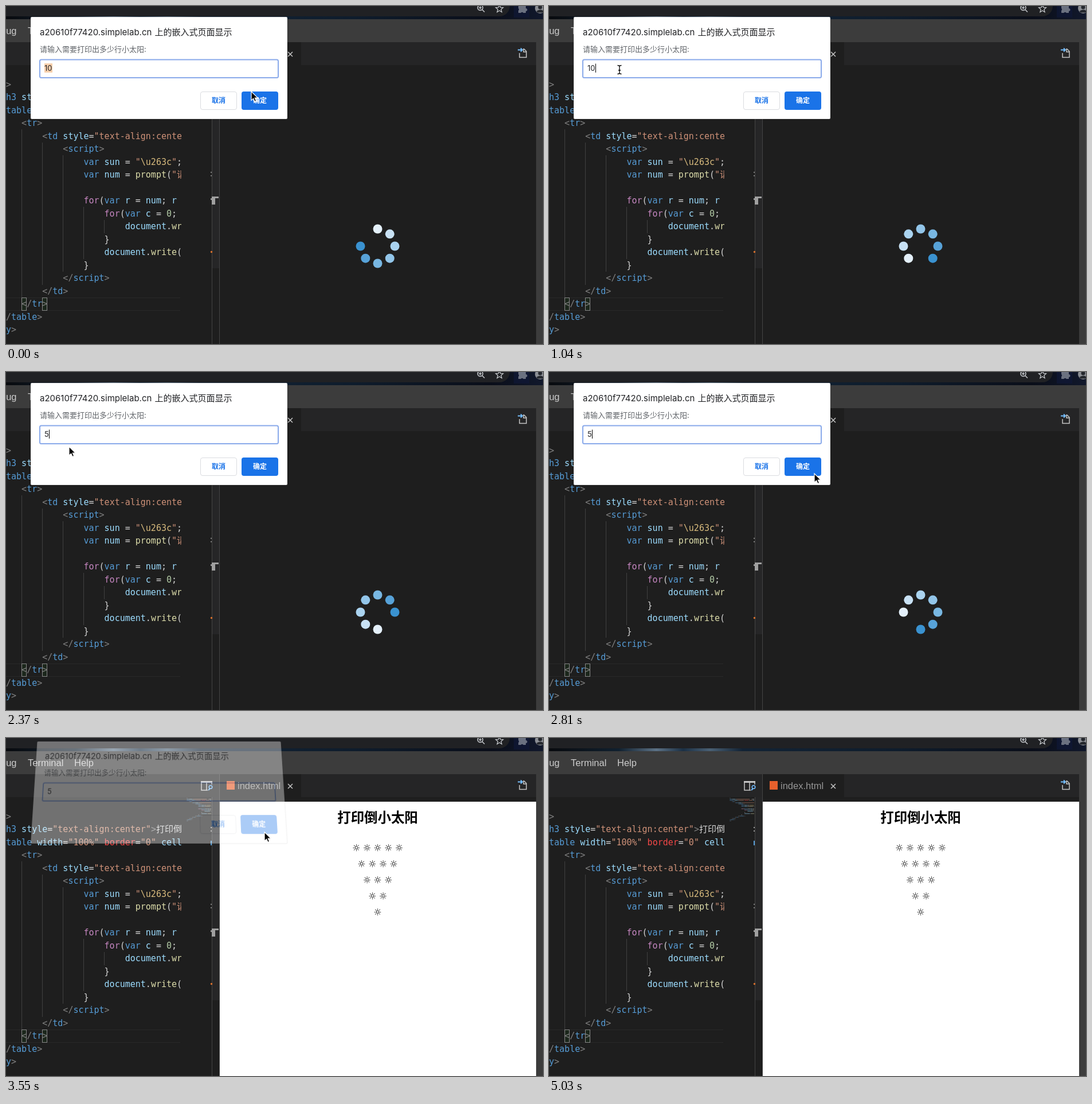
Animation, 937 px wide and 589 px high, one loop 5.33 s. Source, as an HTML page:

```html
<!DOCTYPE html>
<html lang="zh-CN">
<head>
<meta charset="utf-8">
<title>Prompt demo</title>
<style>
html, body { margin: 0; width: 937px; height: 589px; overflow: hidden; background: #1e1e1e; }
svg { position: absolute; left: 0; top: 0; overflow: hidden; }
text { white-space: pre; }
.ui { font: 16.5px "Liberation Sans", Arial, sans-serif; }
.code { font: 15px "DejaVu Sans Mono", "Noto Sans CJK SC", monospace; }
.cjk { font-family: "Noto Sans CJK SC", "Noto Sans CJK", sans-serif; }
.latin { font-family: Inter, sans-serif; }
.button { font: bold 12px "Noto Sans CJK SC", "Noto Sans CJK", sans-serif; text-anchor: middle; }
#dialog { transform-origin: 267px 197px; }
</style>
</head>
<body>
<svg width="937" height="589" viewBox="0 0 937 589">
  <defs>
    <clipPath id="codeClip"><rect y="103" width="306" height="486"/></clipPath>
    <clipPath id="mapClip"><rect x="314" y="103" width="44" height="60"/></clipPath>
    <linearGradient id="sky">
      <stop offset="0" stop-color="#080a0e"/>
      <stop offset=".13" stop-color="#10202f"/>
      <stop offset=".2" stop-color="#5c7185"/>
      <stop offset=".25" stop-color="#1b3045"/>
      <stop offset=".3" stop-color="#4a6074"/>
      <stop offset=".36" stop-color="#122335"/>
      <stop offset=".65" stop-color="#0e1c2c"/>
      <stop offset=".9" stop-color="#0a0e19"/>
      <stop offset="1" stop-color="#11182c"/>
    </linearGradient>
  </defs>

  <!-- browser bar -->
  <rect width="937" height="23" fill="url(#sky)"/>
  <rect x="-30" y="-20" width="909" height="38" rx="18" fill="#202124"/>
  <g fill="none" stroke="#c4c7cb" stroke-width="1.6">
    <circle cx="827.5" cy="3" r="4.5"/>
    <path d="M831 6.5l4 4M825 3h5M827.5 .5v5"/>
    <path d="M861 -2l1.8 4.3 4.700.4-3.600 3.100 1.100 4.700-4-2.500-4 2.500 1.100-4.700-3.600-3.100 4.700-.4z" stroke-width="1.3"/>
  </g>
  <rect x="886" width="27" height="20" fill="#10183a" opacity=".6"/>
  <path d="M894 0h4a2.500 2.500 0 0 1 5 0h4v4a2.500 2.500 0 0 1 0 5v3h-4.500a2.200 2.200 0 0 0-4 0h-4.500v-4a2.500 2.500 0 0 0 0-4z" fill="#6b7180"/>
  <circle cx="932" cy="4" r="9" fill="#8b8e94"/>
  <circle cx="932" cy="2" r="3.500" fill="#24272d"/>
  <path d="M925.500 9q6.500-5 13 0l-2 2.500h-9z" fill="#24272d"/>

  <!-- menu and tabs -->
  <rect y="23" width="937" height="566" fill="#3c3c3c"/>
  <g class="ui" fill="#ccc">
    <text x="18.500" y="49" text-anchor="end">Debug</text>
    <text x="38" y="49">Terminal</text>
    <text x="119" y="49">Help</text>
  </g>
  <rect y="63" width="925" height="526" fill="#1e1e1e"/>
  <rect y="63" width="372" height="40" fill="#252526"/>
  <rect x="515" y="63" width="410" height="40" fill="#252526"/>
  <g fill="none" stroke="#c5c5c5" stroke-width="1.500">
    <path d="M352 91h-11V76h18v5M350 76v15"/>
    <path d="M340 76.500h20" stroke-width="3"/>
    <path d="M353 91l3-3" stroke="#75beff" stroke-width="2"/>
    <circle cx="357" cy="85.500" r="2.800" stroke="#75beff"/>
    <path d="M492 80l8 8m0-8l-8 8"/>
    <path d="M896 82v7.500h12V79l-4-4h-2M903 75v5h5"/>
    <path d="M893 76.500h8m-3-3l3 3-3 3" stroke="#75beff" stroke-width="1.800"/>
  </g>
  <rect x="385" y="75" width="14" height="15" fill="#e8602c"/>
  <text class="ui" x="404" y="89" fill="#969696">index.html</text>

  <!-- editor -->
  <path d="M0 508.500h304M0 530.500h304" stroke="#292929"/>
  <path d="M27.500 215v293M63.500 238v248M99.500 260v203M135.500 350v91M171.500 373v23" stroke="#404040"/>
  <g fill="#1c271c" stroke="#888"><rect x="27.500" y="508.500" width="8" height="22"/><rect x="63.500" y="508.500" width="8" height="22"/></g>
  <g id="code" class="code" clip-path="url(#codeClip)"></g>
  <g id="minimap" clip-path="url(#mapClip)" opacity=".55"></g>
  <rect x="360" y="103" width="12" height="354" fill="#2a2a2b" opacity=".7"/>
  <path d="M359.500 103v486M372.500 63v526" stroke="#444"/>
  <path d="M359 332h12v3h-6v11h-6z" fill="#a0a0a0"/>
  <path d="M357 155h2v2h-2zM357 161h2v2h-2zM357 289h2v1.500h-2zM357 295h2v1.500h-2zM357 335h2v3h-2z" fill="#999"/>
  <path d="M357 179h2v8h-2z" fill="#569cd6"/>
  <circle cx="358.500" cy="428.500" r="1.700" fill="#d9702c"/>

  <!-- preview -->
  <g id="spinner"></g>
  <g id="page">
    <rect x="373" y="111" width="552" height="478" fill="#fff"/>
    <text class="cjk" x="648.500" y="146.500" font-size="23.400" font-weight="bold" text-anchor="middle">打印倒小太阳</text>
    <g id="suns" font-family="DejaVu Sans, sans-serif" font-size="16" text-anchor="middle"></g>
  </g>
</svg>

<svg id="dialog" width="937" height="589" viewBox="0 0 937 589">
  <rect x="43" y="19" width="448" height="178" rx="2" fill="#fff" stroke="#000" stroke-opacity=".3" stroke-width=".6"/>
  <text class="latin" x="59" y="51" font-size="15" fill="#202124">a20610f77420.simplelab.cn</text>
  <text class="cjk" x="259.500" y="51" font-size="15" fill="#202124">上的嵌入式页面显示</text>
  <text class="cjk" x="59" y="80" font-size="13" fill="#5f6368">请输入需要打印出多少行小太阳:</text>
  <rect x="59" y="93.500" width="416" height="31.500" rx="2.500" fill="#fff" stroke="#8aaaea" stroke-width="2"/>
  <rect id="selection" y="100" height="16" fill="#f6cfac"/>
  <text id="value" class="latin" x="67" y="113" font-size="13" fill="#202124"></text>
  <rect id="caret" y="100.500" width="1" height="15.500" fill="#000"/>
  <rect x="339.500" y="149.500" width="63" height="31" rx="3.500" fill="#fff" stroke="#dadce0"/>
  <text class="button" x="371" y="169" fill="#1a73e8">取消</text>
  <rect id="confirm" x="411" y="149" width="64" height="32" rx="4"/>
  <text class="button" x="443" y="169" fill="#fff">确定</text>
</svg>

<svg width="937" height="589" viewBox="0 0 937 589">
  <g id="ring" fill="none">
    <circle r="9.500" stroke="#fff" stroke-width="4" opacity=".85"/>
    <circle r="9.500" stroke="#111" stroke-width="1.800"/>
  </g>
  <path id="arrow" d="M0 0v15.500l3.600-3.300 2.400 5.400 2.700-1.200-2.400-5.200h4.900z" stroke="#fff" stroke-width="1.200"/>
  <g id="beam" fill="none">
    <path d="M-3.500-7.500q3 0 3.500 1.500q.5-1.500 3.500-1.500M0-6v12M-3.500 7.500q3 0 3.500-1.500q.5 1.500 3.500 1.500M-2 1h4" stroke="#fff" stroke-width="3"/>
    <path d="M-3.500-7.500q3 0 3.500 1.500q.5-1.500 3.500-1.500M0-6v12M-3.500 7.500q3 0 3.500-1.500q.5 1.500 3.500 1.500M-2 1h4" stroke="#000" stroke-width="1.300"/>
  </g>
</svg>

<script>
const LOOP = 5330, TICKS = 36, TICK = LOOP / TICKS;
const $ = id => document.getElementById(id);
const add = (parent, tag, attrs, text) => {
  const node = document.createElementNS("http://www.w3.org/2000/svg", tag);
  for (const name in attrs) node.setAttribute(name, attrs[name]);
  if (text) node.textContent = text;
  return parent.appendChild(node);
};
const show = (node, on) => node.style.display = on ? "" : "none";

// Syntax colours: tag, attribute, string, punctuation, function, keyword, ...
const INK = {
  b: "#569cd6", v: "#9cdcfe", s: "#ce9178", g: "#808080", w: "#d4d4d4",
  f: "#dcdcaa", k: "#c586c0", n: "#b5cea8", e: "#d7ba7d", r: "#f44747"
};
const CODE = [
  [1, "{g}>"],
  [1, '{b}h3 {v}style{w}={s}"text-align:center"{g}>{w}打印倒'],
  [1, '{b}table {v}width{w}={s}"100%" {r}border{w}={s}"0" {v}cellspacing'],
  [4, "{g}<{b}tr{g}>"],
  [8, '{g}<{b}td {v}style{w}={s}"text-align:center"'],
  [12, "{g}<{b}script{g}>"],
  [16, '{b}var {v}sun {w}= {s}"{e}\\u263c{s}"{w};'],
  [16, '{b}var {v}num {w}= {f}prompt{w}({s}"请输入'],
  [0, ""],
  [16, "{k}for{w}({b}var {v}r {w}= {v}num{w}; {v}r"],
  [20, "{k}for{w}({b}var {v}c {w}= {n}0{w};"],
  [24, "{v}document{w}.{f}write"],
  [20, "{w}}"],
  [20, "{v}document{w}.{f}write{w}("],
  [16, "{w}}"],
  [12, "{g}</{b}script{g}>"],
  [8, "{g}</{b}td{g}>"],
  [4, "{g}</{b}tr{g}>"],
  [1, "{g}/{b}table{g}>"],
  [1, "{b}y{g}>"]
];
CODE.forEach(([col, line], row) => {
  const text = add($("code"), "text", { x: -9 + 9.03 * col, y: 141.5 + 22.52 * row });
  let at = col;
  const parts = line.split(/\{(\w)\}/);
  for (let i = 1; i < parts.length; i += 2) {
    const [ink, word] = [INK[parts[i]], parts[i + 1]];
    add(text, "tspan", { fill: ink }, word);
    add($("minimap"), "rect", {
      x: 314 + 1.35 * at, y: 104 + 2.1 * row, width: 1.2 * word.length, height: 1, fill: ink
    });
    at += word.length;
  }
});

for (let row = 0; row < 5; row++)
  for (let i = 0, count = 5 - row; i < count; i++)
    add($("suns"), "text", { x: 648.5 + 18.65 * (i - (count - 1) / 2), y: 197 + 28 * row }, "☼");

const SHADES = ["#e4f0fa", "#c8e1f4", "#aad3ef", "#92c5e9", "#78b7e2", "#57a2d8", "#3a92d0", "none"];
const dots = SHADES.map((_, i) => add($("spinner"), "circle", {
  cx: 648.5 + 30 * Math.sin(i * Math.PI / 4),
  cy: 418.5 - 30 * Math.cos(i * Math.PI / 4),
  r: 8
}));

// Pointer path: tick, x, y
const PATH = [
  [0, 428, 149], [2, 380, 146], [5, 160, 115], [7, 123, 111], [9, 84, 109], [11, 65, 109],
  [15, 64, 109], [16, 110, 130], [18, 400, 172], [19, 463, 177], [21, 461, 175], [22, 452, 166],
  [23, 451, 164], [24, 451, 164], [26, 545, 235], [28, 724, 345], [30, 875, 365],
  [31, 893, 115], [33, 917, 545], [36, 917, 545]
];
function pointerAt(tick) {
  const i = PATH.findIndex(p => p[0] > tick);
  const [a, b] = [PATH[i - 1], PATH[i]];
  const u = (tick - a[0]) / (b[0] - a[0]);
  return [a[1] + (b[1] - a[1]) * u, a[2] + (b[2] - a[2]) * u];
}

function drawPointer(tick) {
  const [x, y] = pointerAt(tick);
  const visible = tick < 34 && tick !== 14 && tick !== 15;
  const overInput = tick < 24 && x > 59 && x < 475 && y > 93 && y < 125;
  for (const id of ["arrow", "beam"]) $(id).setAttribute("transform", `translate(${x} ${y})`);
  show($("arrow"), visible && !overInput);
  show($("beam"), visible && overInput);
  $("ring").setAttribute("transform", `translate(${x + (overInput ? 0 : 2)} ${y})`);
  show($("ring"), tick === 6 || (tick > 8 && tick < 12) || tick === 23);
}

function drawDialog(tick) {
  const closing = tick === 24, dialog = $("dialog");
  show(dialog, tick <= 24);
  dialog.style.opacity = closing ? 0.37 : 1;
  dialog.style.transform = closing
    ? "matrix3d(1,0,0,0, 0,1.058,0,-0.000303, 0,0,1,0, 0,-13,0,1)" : "none";

  const typed = tick >= 15;
  const from = tick < 6 || (tick >= 11 && !typed) ? 67 : tick === 10 ? 73 : 81;
  $("value").textContent = typed ? "5" : "10";
  $("selection").setAttribute("x", from);
  $("selection").setAttribute("width", 81 - from);
  $("caret").setAttribute("x", typed ? 75 : 81);
  show($("caret"), from === 81 && !closing);
  $("confirm").setAttribute("fill", tick === 23 ? "#3f7fdb" : "#1a73e8");
}

function drawPreview(tick) {
  const head = Math.floor(tick * 148 / 200 + 0.25);
  dots.forEach((dot, i) => dot.setAttribute("fill", SHADES[(i - head + 32) % 8]));
  show($("page"), tick >= 24);
}

function render(time) {
  let tick = Math.min(TICKS - 1, Math.floor((time % LOOP + 10) / TICK));
  if (tick === 13) tick = 12;
  drawPreview(tick);
  drawDialog(tick);
  drawPointer(tick);
}

const start = performance.now();
function loop(now) {
  render(Math.max(0, now - start));
  requestAnimationFrame(loop);
}
render(0);
requestAnimationFrame(loop);
</script>
</body>
</html>
```
